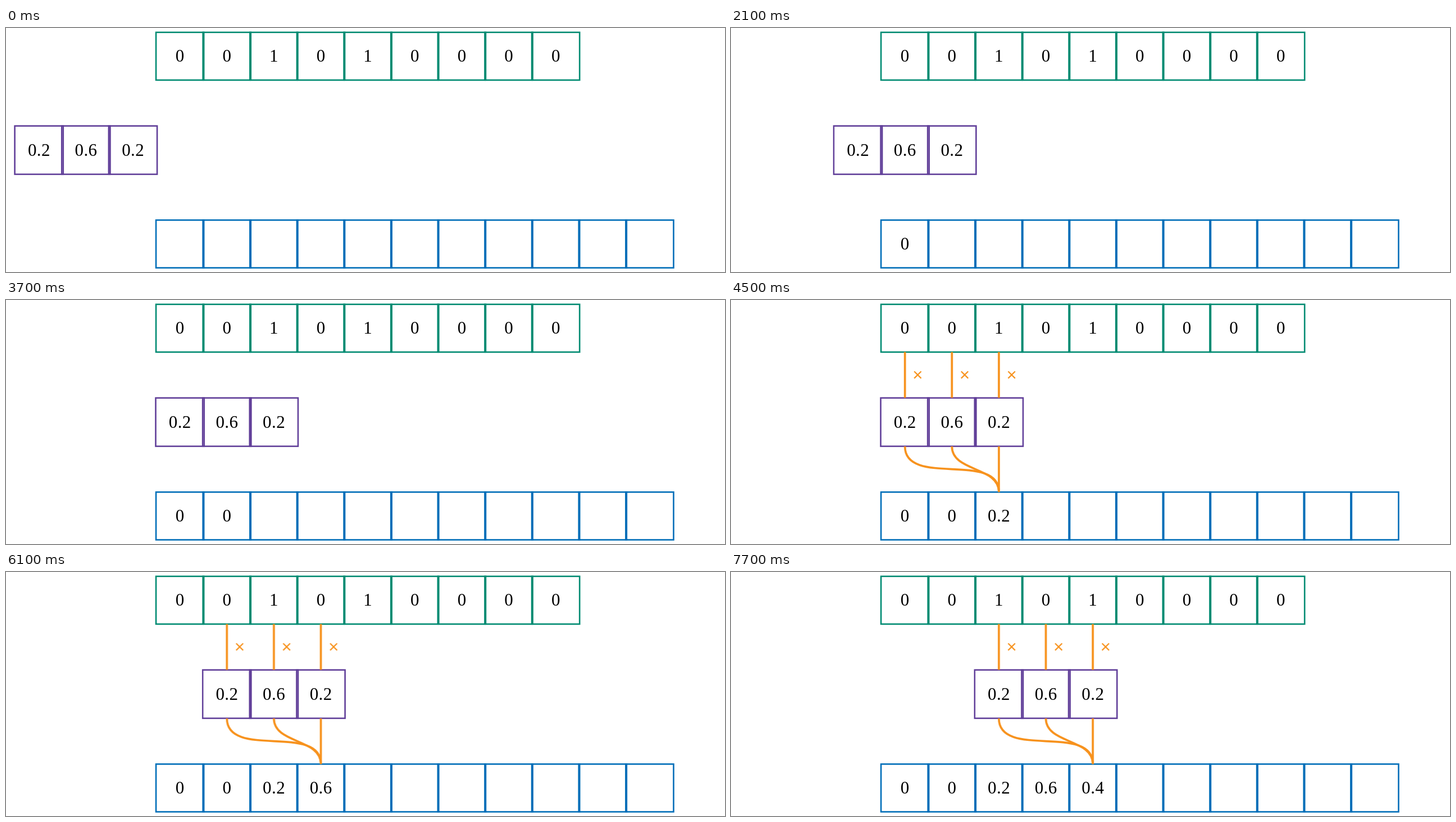
An HTML page for the animation above (8 s loop, 1280x435 px).

```html
<!DOCTYPE html>
<html lang="en">
<head>
<meta charset="utf-8">
<title>1D convolution</title>
<style>
html, body { margin: 0; width: 100%; height: 100%; overflow: hidden; background: #fff; }
svg { display: block; width: 1280px; height: 435px; }
rect, path { fill: none; stroke-width: 2.6; }
text { font: 31px "Liberation Serif", "Times New Roman", serif; text-anchor: middle; fill: #000; }
.input rect { stroke: #008b72; }
.kernel rect { stroke: #613f99; }
.output rect { stroke: #006eb8; }
.wires path { stroke: #f7921d; stroke-width: 3.7; }
.wires .times { stroke-width: 2.2; }

.kernel, .wires, .reveal { animation: 8s step-end infinite; }
.kernel { animation-name: slide; }
.wires { animation-name: blink; }
.r0 { animation-name: show0; }
.r1 { animation-name: show1; }
.r2 { animation-name: show2; }
.r3 { animation-name: show3; }
.r4 { animation-name: show4; }

@keyframes slide {
  0% { transform: translateX(0); }
  6.25% { transform: translateX(83.63px); }
  26.25% { transform: translateX(167.26px); }
  46.25% { transform: translateX(250.89px); }
  66.25% { transform: translateX(334.52px); }
  86.25%, 100% { transform: translateX(418.15px); }
}
@keyframes blink {
  0%, 26.25%, 46.25%, 66.25%, 86.25% { opacity: 0; }
  16.25%, 36.25%, 56.25%, 76.25%, 96.25%, 100% { opacity: 1; }
}
@keyframes show0 { 0% { opacity: 0; } 16.25%, 100% { opacity: 1; } }
@keyframes show1 { 0% { opacity: 0; } 36.25%, 100% { opacity: 1; } }
@keyframes show2 { 0% { opacity: 0; } 56.25%, 100% { opacity: 1; } }
@keyframes show3 { 0% { opacity: 0; } 76.25%, 100% { opacity: 1; } }
@keyframes show4 { 0% { opacity: 0; } 96.25%, 100% { opacity: 1; } }
</style>
</head>
<body>
<svg viewBox="0 0 1280 435">
  <g class="input"></g>
  <g class="output"></g>
  <g class="kernel"></g>
</svg>
<script>
const PITCH = 83.63, FIRST = 309.6;
const TOP = 50.3, MID = 217.7, BOTTOM = 385;
const WIRE = { top: 92.8, kernelTop: 174.4, kernelBottom: 261, end: 342.2 };
const centerX = i => FIRST + i * PITCH;

function add(parent, tag, attrs, content = '') {
  const el = document.createElementNS('http://www.w3.org/2000/svg', tag);
  for (const key in attrs) el.setAttribute(key, attrs[key]);
  el.textContent = content;
  return parent.appendChild(el);
}

function box(parent, x, y, size) {
  add(parent, 'rect', { x: x - size / 2, y: y - size / 2, width: size, height: size });
}

function label(parent, x, y, value, cls = '') {
  const spacing = value.length > 1 ? 0.4 : 0;
  add(parent, 'text', { x: x + spacing / 2, y: y + 10.1, 'letter-spacing': spacing, class: cls }, value);
}

// Vertical departure and arrival, with handles proportional to the distance
function curve(x1, y1, x2, y2) {
  const h = 0.3915 * Math.hypot(x2 - x1, y2 - y1);
  return `M${x1} ${y1}C${x1} ${y1 + h} ${x2} ${y2 - h} ${x2} ${y2}`;
}

const [input, output, kernel] = ['.input', '.output', '.kernel'].map(s => document.querySelector(s));

[...'001010000'].forEach((value, i) => {
  box(input, centerX(i), TOP, 85.1);
  label(input, centerX(i), TOP, value);
});

for (let i = 0; i < 11; i++) box(output, centerX(i), BOTTOM, 85.1);
['0', '0', '0.2', '0.6', '0.4'].forEach((value, i) =>
  label(output, centerX(i), BOTTOM, value, `reveal r${i}`));

['0.2', '0.6', '0.2'].forEach((value, i) => {
  box(kernel, centerX(i - 3), MID, 86.2);
  label(kernel, centerX(i - 3), MID, value);
});

const wires = add(kernel, 'g', { class: 'wires' });
for (let i = 0; i < 3; i++) {
  const x = centerX(i - 3);
  const g = add(wires, 'g', { class: `reveal r${2 - i}` });
  add(g, 'path', { d: `M${x} ${WIRE.top}V${WIRE.kernelTop}` });
  add(g, 'path', { d: curve(x, WIRE.kernelBottom, centerX(-1), WIRE.end) });
  add(g, 'path', { class: 'times', d: `M${x + 16.5} 127.2l12.4 12.4m0 -12.4l-12.4 12.4` });
}
</script>
</body>
</html>
```
